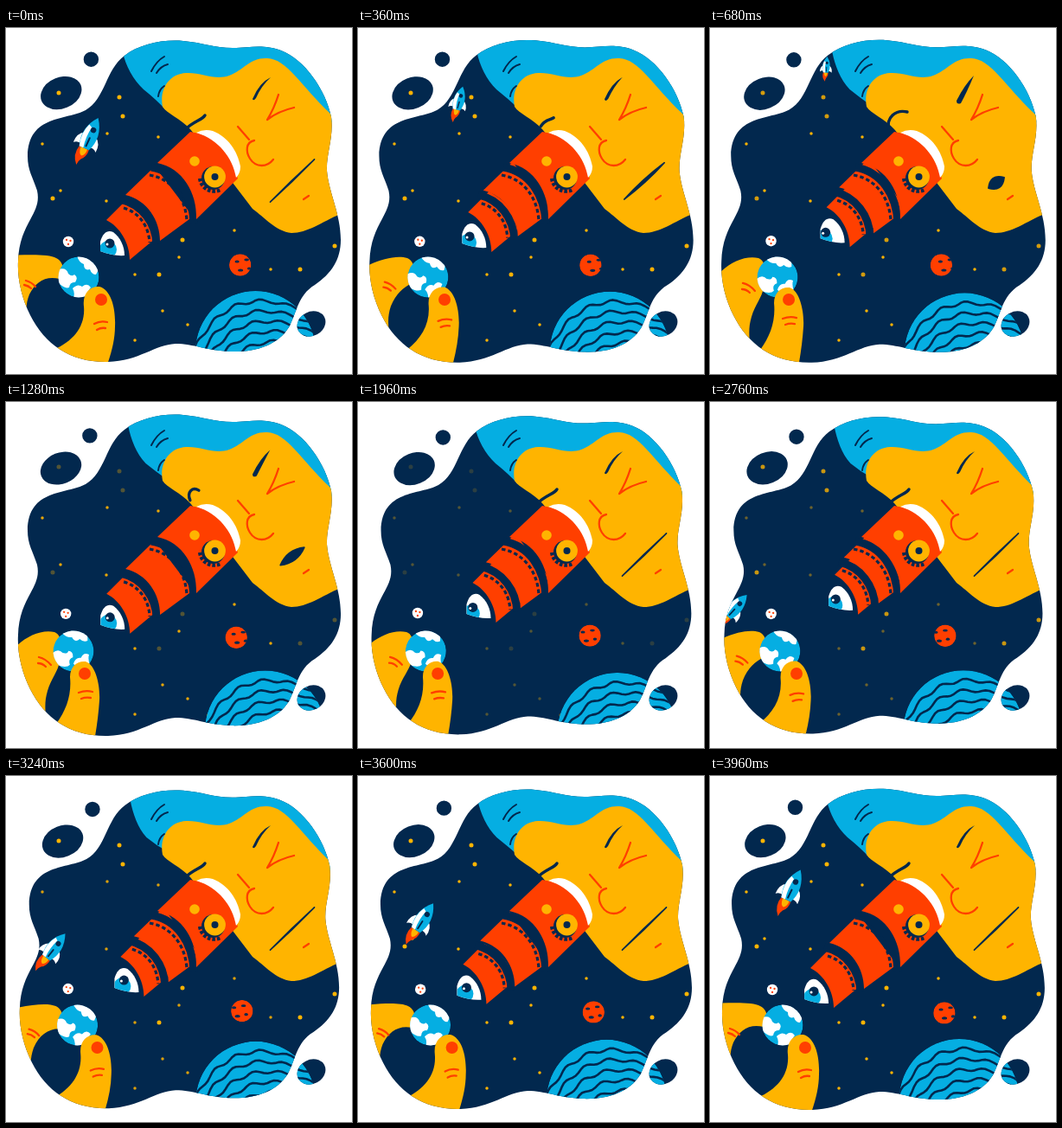
An HTML page for the animation above (4000 ms loop, 400 by 400 pixels).

```html
<!DOCTYPE html>
<html lang="en">
<head>
<meta charset="utf-8">
<title>Stargazer</title>
<style>
html, body { margin: 0; width: 100%; height: 100%; overflow: hidden; background: #fff; }
svg { display: block; width: 100vw; height: 100vh; }
.navy { fill: #02284e; } .yellow { fill: #ffb400; } .red { fill: #ff3f00; }
.blue { fill: #05aee2; } .white { fill: #fff; }
.line, .redline, .dots { fill: none; stroke-linecap: round; stroke-linejoin: round; stroke-width: 2; }
.line { stroke: #02284e; }
.redline { stroke: #ff3f00; stroke-width: 2.3; }
.dots { stroke: #ffb400; }
.dash { stroke-width: 3.2; stroke-dasharray: 4.5 3; stroke-linecap: butt; }
.seam { stroke-width: 9; stroke-linecap: butt; }
</style>
</head>
<body>
<svg viewBox="0 0 400 400">
  <defs>
    <clipPath id="window">
      <path id="blob" d="M137 32C154 19 180 13 205 15C228 17 240 23 262 23C282 23 296 18 318 26C345 36 370 72 376 103C379 127 370 145 371 165C373 190 387 215 387 245C387 268 376 284 357 297C337 309 336 330 327 346C314 367 288 375 260 374C232 373 217 365 196 365C172 366 154 385 118 386C75 387 45 366 28 332C18 312 13 290 14 270C15 225 42 215 36 188C31 172 25 165 25 148C26 100 70 107 92 95C115 82 115 48 137 32Z"/>
      <ellipse id="drop" rx="24.5" ry="18"/>
      <circle id="droplet" r="8.7"/>
      <ellipse cx="353" cy="342" rx="17" ry="14" transform="rotate(-28 353 342)"/>
    </clipPath>
    <clipPath id="planetClip"><circle r="69.5"/></clipPath>
    <clipPath id="marsClip"><circle r="12.7"/></clipPath>
    <clipPath id="earthClip"><circle r="23.5"/></clipPath>
    <clipPath id="eyeClip"><path d="M109 247C112 236 118 233 124 236C132 242 137 252 137 263Q124 264 109 258Z"/></clipPath>
  </defs>
  <g clip-path="url(#window)">
    <rect class="navy" width="400" height="400"/>
    <path id="bigStars" class="dots" style="stroke-width:5" d="M61 75h0M131 80h0M54 197h0M204 245h0M177 285h0M340 279h0M380 252h0M135 102h0"/>
    <path id="smallStars" class="dots" style="stroke-width:3.5" d="M42 134h0M117 122h0M116 200h0M181 327h0M149 361h0M210 343h0M149 285h0M306 279h0M234 362h0M176 126h0M63 188h0M200 265h0M264 234h0"/>

    <g id="planet" clip-path="url(#planetClip)">
      <circle class="blue" r="69.5"/>
      <path id="stripes" class="line" transform="rotate(-20)" style="stroke-width:2.6"/>
    </g>

    <g id="mars" clip-path="url(#marsClip)">
      <circle class="red" r="12.7"/>
      <g id="craters" class="navy">
        <ellipse cx="-6" cy="-4" rx="2.6" ry="1.5"/><ellipse cx="5" cy="-6" rx="2.8" ry="1.4"/>
        <ellipse cx="-2" cy="6" rx="3" ry="1.6"/><ellipse cx="8" cy="4" rx="2.2" ry="1.6"/>
      </g>
    </g>

    <g id="moon">
      <circle class="white" r="6.2"/>
      <path class="redline" d="M-2-2h0M2.5-1h0M0 3h0"/>
    </g>

    <g id="rocket">
      <path class="red" d="M-6 17Q-9 29 0 38Q0 33 2 30Q7 25 6 17Z"/>
      <path class="yellow" d="M-4 17Q-3 26 1 26Q5 23 4 17Z"/>
      <path class="white" d="M-7 0Q-15 5-14 16Q-10 12-5 14ZM7 0Q15 5 14 16Q10 12 5 14Z"/>
      <path class="blue" d="M0-21Q-14-3-6 17H6Q14-3 0-21Z"/>
      <path class="white" d="M-6-10Q-11 2-6 17H-1Q-4 4-2-8Z"/>
      <circle class="navy" cx="1" cy="-6" r="3.2"/>
      <path class="line" d="M1 4V14"/>
    </g>

    <path id="hair" class="blue"/>
    <path class="yellow" d="M181 91C177 70 189 53 208 52C226 51 241 61 258 55C276 48 282 34 302 35C325 36 339 65 376 100L405 150V208C372 218 353 237 330 237C312 235 299 219 285 209L240 150L213 117C202 105 186 99 181 91Z"/>
    <path class="line" d="M168 50Q174 38 183 33M174 52Q179 44 187 42M176 79Q177 71 183 67"/>

    <path class="redline" d="M315 77Q310 93 302 106Q315 96 333 92M268 114L281 129M287 130C277 132 277 143 282 151C289 162 302 161 309 152M344 198L350 194"/>
    <path id="brow" class="navy"/>
    <path id="farBrow" class="line" style="stroke-width:3.4"/>
    <path id="mouth" class="navy" stroke="#02284e" stroke-width="1.6" stroke-linejoin="round"/>

    <g id="front">
      <path class="red" d="M140 198C164 211 172 225 173 243L143 268C143 249 132 230 116 222Z"/>
      <path class="white" d="M109 247C112 236 118 233 124 236C132 242 137 252 137 263Q124 264 109 258Z"/>
      <g clip-path="url(#eyeClip)">
        <g id="iris"><circle class="blue" cx="118" cy="256" r="10"/><circle class="navy" cx="120" cy="249" r="5.5"/><circle class="white" cx="117" cy="250" r="1.5"/></g>
      </g>
    </g>
    <g id="middle">
      <path class="line dash" d="M136 208C153 213 165 228 166 248"/>
      <path class="line seam" d="M132 198C158 204 173 226 174 250"/>
      <path class="red" d="M172 160L216 218L178 246C178 222 163 199 138 193Z"/>
    </g>
    <path class="line dash" d="M166 170C190 174 207 194 209 222"/>
    <path class="line seam" d="M168 161C198 166 216 193 217 226"/>
    <path class="red" d="M213 120Q253 124 268 174L220 221C221 190 204 162 175 156Z"/>
    <path class="white" d="M220 121Q229 116 239 119C257 126 268 143 271 160Q271 168 266 173C262 150 246 129 220 121Z"/>
    <circle class="yellow" cx="218" cy="154" r="5.8"/>
    <path class="line" d="M224 174A16.5 16.5 0 0 0 248 187" style="stroke-width:4;stroke-dasharray:3.5 2;stroke-linecap:butt"/>
    <circle class="navy" cx="239.5" cy="173.5" r="13.5"/>
    <circle class="yellow" cx="241.5" cy="172" r="12.4"/>
    <circle class="navy" cx="241.5" cy="172" r="4"/>

    <path id="finger" class="yellow"/>
    <path id="fingerLines" class="redline"/>
    <g id="earth" clip-path="url(#earthClip)">
      <circle class="blue" r="23.5"/>
      <g class="white">
        <path d="M-24-9Q-14-12-12-4Q-8 0-5-3Q0 0-4 6Q-10 5-11 12Q-16 14-24 6Z"/>
        <path d="M-2-25Q0-17 6-15Q6-7 13-9Q15-3 20-3L26-14L14-25Z"/>
        <path d="M-7 13Q-1 7 4 11Q10 6 14 12Q10 16 9 24H-6Q-4 18-7 13Z"/>
      </g>
    </g>
    <path id="thumb" class="yellow"/>
    <path id="thumbLines" class="redline"/>
    <circle id="nail" class="red" r="7"/>
  </g>
</svg>
<script>
const LOOP = 4000;
const set = (id, name, value) => document.getElementById(id).setAttribute(name, value);
const move = (id, x, y, more = '') => set(id, 'transform', `translate(${x} ${y}) ${more}`);

// Motion: a slow sway over the loop, a smooth pulse and a smooth step.
const wave = (t, peak) => Math.cos((t - peak) / LOOP * 2 * Math.PI);
const pulse = (t, peak, width) => Math.abs(t - peak) < width ? Math.cos((t - peak) / width * Math.PI / 2) ** 2 : 0;
function ease(t, from, to) {
  const k = Math.min(1, Math.max(0, (t - from) / (to - from)));
  return k * k * (3 - 2 * k);
}

// Blend two paths that share the same commands.
function blend(a, b, k) {
  const ends = b.match(/-?[\d.]+/g);
  let i = 0;
  return a.replace(/-?[\d.]+/g, v => (+v + (ends[i++] - v) * k).toFixed(2));
}

// Open and closed pose of each part of the hand.
const hand = {
  finger: ['M0 263C25 262 50 261 58 266C67 270 68 282 62 290C45 286 34 294 27 308C24 316 23 322 24 330L0 330Z',
    'M0 296C14 276 36 262 56 266C65 269 64 282 62 300C60 312 52 320 48 334C45 344 45 352 46 364L0 364Z'],
  fingerLines: ['M23 292Q30 294 34 299M21 297Q26 298 29 301', 'M38 295Q46 297 52 304M37 302Q42 302 46 306'],
  thumb: ['M55 372C78 362 92 345 90 322C88 306 98 298 108 299C122 303 127 325 126 345C126 360 122 376 116 392L55 392Z',
    'M58 372C70 356 76 338 74 318C74 306 82 299 92 300C104 304 109 328 108 345C107 360 105 376 102 392L58 392Z'],
  thumbLines: ['M102 342Q109 338 117 340M105 349Q110 346 115 347', 'M84 336Q92 333 100 335M87 343Q92 341 98 342']
};

function stripes(phase) {
  let d = '';
  for (let row = 0; row < 11; row++)
    for (let x = -72; x <= 72; x += 4) {
      const y = -57 + row * 12.5 + x * x / 140 + 2 * Math.sin(x / 4.5 + row * 1.7 + phase);
      d += `${x > -72 ? 'L' : 'M'}${x} ${y.toFixed(1)}`;
    }
  return d;
}

function drawSky(t) {
  set('blob', 'transform', `translate(200 200) scale(${1 + .009 * (wave(t, 650) - .52)}) translate(-200 -200)`);
  move('drop', 64.5 + 1.6 * wave(t, 2700), 76 - wave(t, 3900), 'rotate(-22)');
  move('droplet', 98.4 + 1.7 * wave(t, 3000), 38.6 - 2.5 * wave(t, 4200));
  set('bigStars', 'opacity', 1 - .88 * pulse(t, 1750, 1500));
  set('smallStars', 'opacity', 1 - .8 * pulse(t, 2300, 1300));

  move('planet', 294 + 6.5 * wave(t, 1650), 378 - 4.5 * wave(t, 0));
  set('stripes', 'd', stripes(wave(t, 1650)));
  move('mars', 269.5 + 3.3 * wave(t, 3240), 272 + 2.3 * wave(t, 340));
  move('craters', 5 * wave(t, 680), 0);
  move('moon', 70.5 + 1.7 * wave(t, 3700), 245.5 + 1.5 * wave(t, 0));

  const p = (t + 1500) % LOOP / 2300;
  const size = .85 + .25 * p - .6 * ease(p, .65, .95);
  move('rocket', 16 + 125 * p, 255 - 155 * p - 72 * p * p, `rotate(${43 - 42 * p * p}) scale(${size})`);
  set('rocket', 'visibility', p > 1 ? 'hidden' : 'visible');
}

function drawFace(t) {
  const sway = 8 * pulse(t, 980, 1000) + 10 * pulse(t, 3000, 1000);
  set('hair', 'd', `M${135 + sway} 28C${138 + sway} 43 ${147 + sway * .6} 60 ${159 + sway * .4} 71Q174 ${83 - sway * .3} 185 ${95 - sway}L240 100L390 110V0H130Z`);

  const mood = ease(t, 250, 680) * (1 - ease(t, 1050, 1750));
  set('brow', 'd', blend('M306 57Q293 63 285 82Q286 85 289 81Q295 67 306 57Z', 'M305 55Q294 66 285 84Q285 89 290 87Q297 74 305 55Z', mood));
  set('farBrow', 'd', blend('M230 101C226 107 216 108 208 117', 'M207 118C203 103 215 94 228 97', mood));
  const half = 35.5 - 24.5 * mood, bulge = 1 + 12 * mood;
  set('mouth', 'd', `M${-half} 0Q0 ${-bulge} ${half} 0Q0 ${bulge} ${-half} 0Z`);
  move('mouth', 331, 176.5 + 2.5 * mood, `rotate(${-44 + 10 * mood})`);
}

function drawTelescope(t) {
  const slide = 24 * pulse(t, 640, 640) + 37 * pulse(t, 2600, 1400);
  const gaze = pulse(t, 680, 600) + pulse(t, 2300, 1000);
  move('front', slide * .785, -slide * .62);
  move('middle', slide * .47, -slide * .37);
  move('iris', -5 * gaze, 2 * gaze);
}

function drawHand(t) {
  const grip = ease(t, 0, 700) * (1 - ease(t, 1600, LOOP));
  for (const part in hand) set(part, 'd', blend(...hand[part], grip));
  move('earth', 84 - 6 * grip, 288, `rotate(${-28 * grip})`);
  move('nail', 110 - 19 * grip, 314);
}

function tick(now) {
  const t = now % LOOP;
  drawSky(t);
  drawFace(t);
  drawTelescope(t);
  drawHand(t);
  requestAnimationFrame(tick);
}
tick(0);
</script>
</body>
</html>
```
